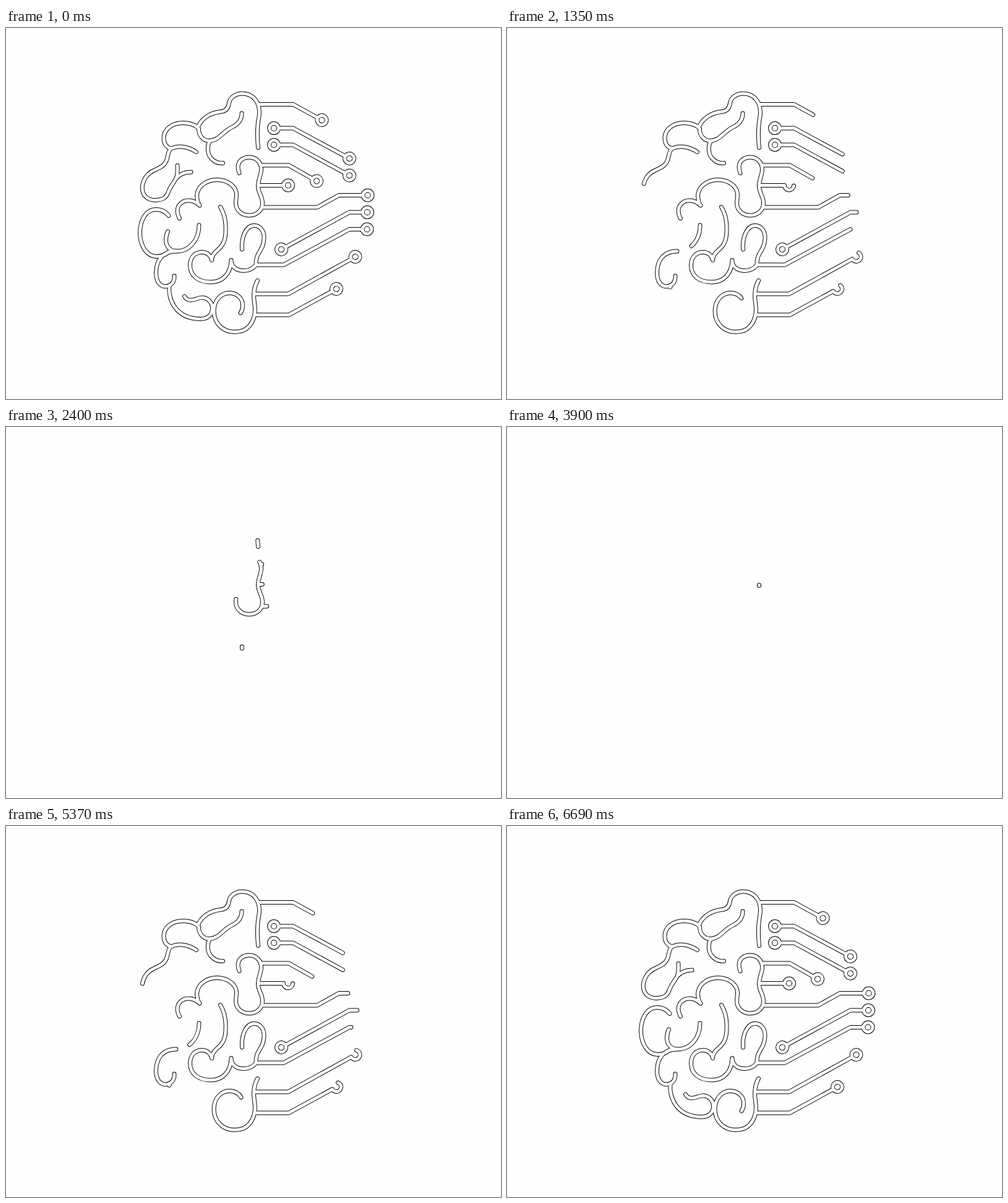
An HTML page for the animation above (6720 ms loop, 800x600 px).

```html
<!DOCTYPE html>
<html lang="en">
<head>
<meta charset="utf-8">
<title>Circuit brain</title>
<style>
  html, body { margin: 0; width: 100%; height: 100%; overflow: hidden; background: #fefefe; }
  svg { display: block; width: 800px; height: 600px; }
  use { fill: none; stroke-linecap: round; stroke-linejoin: round; }
  .edge { stroke: #000; stroke-width: 6.8px; }
  .core { stroke: #fefefe; stroke-width: 4.9px; }
</style>
</head>
<body>
<svg viewBox="0 0 800 600">
  <defs><g id="lines"></g></defs>
  <use class="edge" href="#lines"/>
  <use class="core" href="#lines"/>
</svg>
<script>
const LOOP = 6720, STEP = 30, RADIUS = 7.5;
const group = document.getElementById('lines');
const strokes = [];

// Each stroke grows from its first point between two moments (ms).
function stroke(start, end, d) {
  const path = document.createElementNS('http://www.w3.org/2000/svg', 'path');
  path.setAttribute('d', d);
  path.setAttribute('pathLength', 1);
  group.append(path);
  strokes.push({ path, start, end });
}

function rim([cx, cy], [x, y]) {
  const k = RADIUS / Math.hypot(x - cx, y - cy);
  return [cx + (x - cx) * k, cy + (y - cy) * k];
}

// Full circle, starting and ending at the given rim point.
function ring([cx, cy], [x, y]) {
  const dx = 2 * (cx - x), dy = 2 * (cy - y);
  const arc = `a${RADIUS} ${RADIUS} 0 0 0 `;
  return `${arc}${dx} ${dy}${arc}${-dx} ${-dy}`;
}

// Polyline that ends in a ring; it may also begin with one.
function wire(start, end, points, ringFirst) {
  const pts = points.slice(), last = pts.pop();
  let d = '';
  if (ringFirst) {
    const first = pts.shift(), from = rim(first, pts[0]);
    d = `M${from}${ring(first, from)}`;
  } else {
    d = `M${pts[0]}`;
  }
  const to = rim(last, pts[pts.length - 1]);
  for (const p of [...pts, to]) d += `L${p}`;
  stroke(start, end, d + ring(last, to));
}

// Middle stem and its two arms
stroke(0, 1077, 'M407.5 256C408 268 414.5 272 414.5 283C414.5 296 404 303 393 303C381 303 371.5 295 371.5 283C371.5 278 372.5 275 372.5 270C372.5 256 358 245.5 341 245.5C322 245.5 308.5 258 308.5 272C309 278 310 284 313 287C308 282 302 279 295 279C284 279 277 287 277 296C277 302 279 305 280.5 308');
stroke(0, 1000, 'M407.5 256C407.5 243 412.5 238 412.5 229C412.5 217 404 209 393 209C382 209 375 216 375 225C375 229 376 232 377 234.5');

// Upper lobes
stroke(307, 1488, 'M407.5 193.5C406 178 405.5 160 409 143C412 120 399 106 382 106C370 106 362 113 360.5 121C359.5 130 355 135 346 135.5C330 137 315 147 310 161C304 156 296 153.5 286 153.5C268 153.5 255 164 255 178C255 188 260 193.5 267 195C280 189 295 192 307.5 200.5');
stroke(500, 1040, 'M381 138C381 148 376 155 366 160C349 168 345 182 328 182.5C318 182 311 173 311.5 163');
stroke(1000, 1450, 'M329 184C325 190 325 203 331 210C336 216 343 219 350.5 218.5');
stroke(1100, 2000, 'M265 197C261 202 262 210 258 217C252 229 234 228 226 241C221 249 219.5 256 220.5 262C222 273 231 278.5 241 278.5C254 278 259 274 262 266C265 257 272 249 275 243C278 236 277 230 277 222.5');
stroke(1850, 2200, 'M275 243C281 236 289 233 299 233');

// Lower lobes
stroke(391, 1237, 'M381.5 358C380 338 388 319.5 401 319.5C412 319.5 417.5 330 417 340C416 362 403 362 404 383C398 391 391 392.5 384 392.5C372 392.5 364 386 364 375.5C363 398 350 411 331 411C310 411 297.5 400 297.5 384C297.5 370 306 362.5 317 362.5C325 362.5 331 368 332.5 375.5');
stroke(1150, 1480, 'M333 372C334 364 342 360 347 354C354 346 355.5 336 355 320C354.5 307 351 297 346.5 289.5');
stroke(612, 1722, 'M406.5 408.5C400 420 399.5 432 401.5 445C405 465 398 482 384 489C380 490.5 375 491.5 369 491.5C350 491.5 336 477 336 458C336 441 347 428.5 361 428.5C374 428.5 383 438 382.5 449C382.5 454 381 458 379 461');
stroke(1030, 1480, 'M275 361C252 361 242.5 377 242.5 396C242.5 410 249 418 258 418C267 417 272.5 411 272 401');
stroke(1460, 2750, 'M264 419C262 436 272 470 314 470.5C327 470.5 333.5 463 333.5 453C333 442 325 436 316 436C308 437 303 441 297 440C293 439.5 290 437 288.5 434');
stroke(1150, 1980, 'M312 319C312 342 297 361 276 361C264 361 258.5 352 258.5 343C258.5 338 259.5 333 261.5 329');
stroke(1510, 2800, 'M263 362C257 368 251 369.5 243 369.5C226 369 216.5 350 216.5 331C216.5 310 227 293.5 242 293.5C251 293.5 258 297 263 303.5');

// Circuit wires
wire(579, 2175, [[410, 123.5], [464, 123.5], [510.5, 149]]);
wire(664, 1904, [[433, 162], [464, 162], [555, 211]], true);
wire(664, 1904, [[433, 189], [464, 189], [555, 238.5]], true);
wire(357, 2272, [[413, 222], [457, 222], [502, 247.5]]);
wire(55, 2272, [[408, 254.5], [456, 254.5]]);
wire(174, 2348, [[414, 290], [503, 290], [538, 270.5], [584.5, 270.5]]);
wire(664, 1904, [[445, 358], [555, 298], [584, 298]], true);
wire(742, 1917, [[405, 383], [449, 383], [555, 325.5], [583.5, 325.5]]);
wire(807, 1654, [[402, 430], [456, 430], [564.5, 370]]);
wire(930, 1646, [[404, 464], [457, 464], [534, 422]]);

const ease = x => (1 - Math.cos(Math.PI * x)) / 2;

function draw(now) {
  const t = Math.floor((now % LOOP) / STEP) * STEP;
  const clock = t < LOOP / 2 ? 2840 - t : t - 3870;
  for (const { path, start, end } of strokes) {
    const x = Math.min(1, (clock - start) / (end - start));
    path.style.display = x > 0 ? '' : 'none';
    if (x > 0) path.setAttribute('stroke-dasharray', x < 1 ? `${ease(x)} 2` : 'none');
  }
}

const origin = performance.now();
function tick() {
  draw(performance.now() - origin);
  requestAnimationFrame(tick);
}
tick();
</script>
</body>
</html>
```
